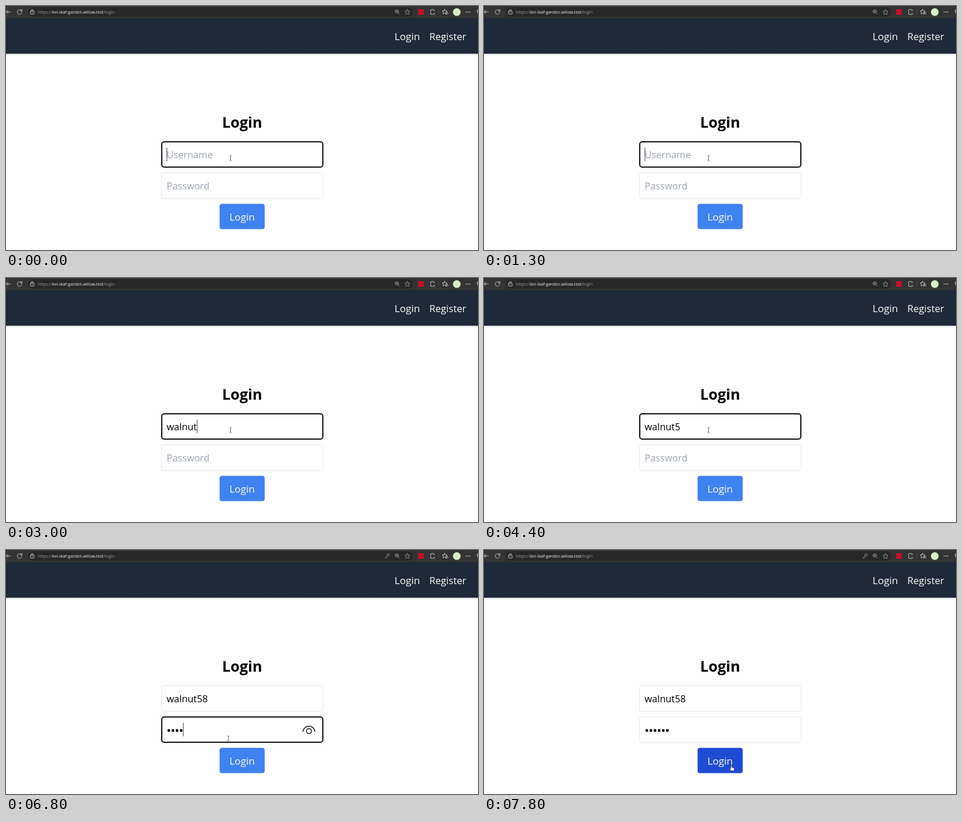
Write an HTML page that moves like this. It is 800 px wide and 415 px high and loops after 8000 ms.

```html
<!DOCTYPE html>
<html lang="en">
<head>
<meta charset="utf-8">
<title>Login form</title>
<style>
  html, body { margin: 0; width: 100%; height: 100%; overflow: hidden; background: #fefefe; }
  svg { display: block; width: 100%; height: 100%; }
  text { font-family: "Open Sans", "Noto Sans", sans-serif; font-size: 16.2px; white-space: pre; }
  .icon { fill: none; stroke: #c4c4c4; stroke-width: 1; stroke-linecap: round; stroke-linejoin: round; }
  .dim { stroke: #8e8e8e; }
  .hint { fill: #9ca3af; }
  .light { fill: #fff; }
</style>
</head>
<body>
<svg viewBox="0 0 800 415" xmlns="http://www.w3.org/2000/svg">
  <defs>
    <linearGradient id="shade" x1="0" y1="0" x2="0" y2="1">
      <stop offset="0" stop-color="#1f2937" stop-opacity=".28"/>
      <stop offset="1" stop-color="#1f2937" stop-opacity="0"/>
    </linearGradient>
  </defs>
  <rect width="800" height="415" fill="#fefefe"/>

  <!-- browser bar -->
  <rect width="800" height="21" fill="#333"/>
  <rect x="36.5" y="1.5" width="654" height="17.5" rx="8.7" fill="#272727" stroke="#3e3e3e" stroke-width=".6"/>
  <path class="icon" d="M0.5 10H7.5M3.5 7L0.5 10L3.5 13"/>
  <path class="icon" d="M26.6 8.2A4 4 0 1 0 27 11M27 5.8V8.6H24.2"/>
  <g class="icon">
    <rect x="41.3" y="8.8" width="6.4" height="5" rx="1"/>
    <path d="M42.8 8.6V7.6A1.7 1.7 0 0 1 46.2 7.6V8.6M44.5 11V11.6"/>
  </g>
  <text x="54" y="12.8" fill="#9d9d9d" style="font-size:7.15px">https://<tspan fill="#f2f2f2">kin-leaf-garden.willow.test</tspan>/login</text>
  <g id="key" class="icon dim">
    <circle cx="647.5" cy="8.8" r="2.2"/>
    <path d="M645.8 10.4L642.6 13.6H644.6"/>
  </g>
  <g class="icon dim">
    <circle cx="662.3" cy="9.3" r="3"/>
    <path d="M664.6 11.6L667 14M661 9.3H663.6M662.3 8V10.6"/>
    <path id="star"/>
  </g>
  <rect x="698.5" y="5.5" width="9.5" height="9.5" fill="#c9102f"/>
  <path class="icon" d="M726.2 8.2V7H723.8A1.6 1.6 0 0 0 720.6 7H719.5V9A1.6 1.6 0 0 1 719.5 12V14H726.2V12.4"/>
  <path d="M733.5 7V13" stroke="#555" stroke-width=".8"/>
  <path id="favs" class="icon"/>
  <path class="icon" d="M746.5 10.8H749M746 13H749"/>
  <circle cx="764" cy="10.3" r="6.5" fill="#d8ecca"/>
  <g fill="#d0d0d0"><circle cx="780" cy="10.3" r=".9"/><circle cx="783" cy="10.3" r=".9"/><circle cx="786" cy="10.3" r=".9"/></g>
  <rect x="798.6" y="6" width="1.4" height="6" fill="#a8a8a8"/>

  <!-- page header -->
  <rect y="20.5" width="800" height="60.5" fill="#1f2937"/>
  <rect y="81" width="800" height="3" fill="url(#shade)"/>
  <text class="light" x="658.6" y="57.8" style="font-size:17px">Login</text>
  <text class="light" x="717.6" y="57.8" style="font-size:16.5px">Register</text>

  <!-- form -->
  <text x="400.2" y="207" text-anchor="middle" font-weight="700" style="font-size:25px">Login</text>
  <rect id="nameBox" rx="4"/>
  <rect id="passBox" rx="4"/>
  <text id="nameHint" class="hint" x="272.2" y="259.4">Username</text>
  <text id="name" x="272.2" y="259.4"></text>
  <text id="passHint" class="hint" x="272.2" y="312.4">Password</text>
  <g id="dots"></g>
  <g id="eye" fill="none" stroke="#161616" stroke-width="1.5" stroke-linecap="round">
    <path d="M503.3 308.5C505.5 296.8 521.5 296.8 523.7 308.5"/>
    <circle cx="513.5" cy="308" r="4.2"/>
  </g>
  <rect id="caret" width="1" height="23" fill="#444"/>
  <rect id="button" x="362" y="336.5" width="76.5" height="43" rx="4"/>
  <text class="light" x="400.2" y="364.8" text-anchor="middle" style="font-size:17px">Login</text>

  <!-- pointers -->
  <path id="beam" d="M-1.8 -4H-.5L0 -3.6L.5 -4H1.8M0 -3.6V3.6M-1.8 4H-.5L0 3.6L.5 4H1.8" fill="none" stroke="#555" stroke-width=".9"/>
  <path id="hand" d="M-2 -4.4Q-1 -5.6 0 -4.4V-1.3L3.2 -.6Q4.2 -.2 4 1.2L3.2 4.8H-1.2L-3.8 1.4Q-4 .2 -2 .8Z" fill="#fff" stroke="#222" stroke-width=".8" stroke-linejoin="round"/>
</svg>
<script>
const LOOP = 8000, LEFT = 272.2, DOT_STEP = 6.95;
const FOCUS_PASS = 5300, FIRST_KEY = 6000, HOVER = 7200, CLICK = 7700;

// each entry: start time, value held until the next entry
const typed = [[0, ''], [1600, 'wa'], [2200, 'wal'], [2700, 'waln'], [2800, 'walnu'],
  [3000, 'walnut'], [3100, 'walnut5'], [3500, 'walnut52'], [4400, 'walnut5'], [4700, 'walnut58']];
const secret = [[0, 0], [6000, 2], [6100, 3], [6800, 4], [7000, 5], [7200, 6]];
const blink = [[0, true], [800, false], [1300, true], [4400, false], [4700, true], [CLICK, false]];
const pointer = [[0, [380.5, 258.5]], [5000, [380, 266]], [5100, [379, 282]], [5200, [377, 300]],
  [5300, [376.2, 307]], [5400, [376.2, 308.7]], [6100, [376.5, 313.5]], [6300, [377, 315]],
  [6400, [377, 316.7]], [6800, [377, 320.5]], [7000, [377, 323.5]], [7200, [382, 340]],
  [7300, [390.5, 348]], [7400, [415, 362]], [7500, [436, 371]], [7700, [428, 371]], [7800, [420.2, 371]]];

const el = id => document.getElementById(id);
const held = (track, t) => track.filter(([start]) => start <= t).pop()[1];
const show = (id, on) => el(id).setAttribute('visibility', on ? 'visible' : 'hidden');
const set = (id, attrs) => {
  for (const k in attrs) el(id).setAttribute(k, attrs[k]);
};

function starPath(cx, cy, r) {
  const points = Array.from({ length: 10 }, (_, i) => {
    const a = i * Math.PI / 5 - Math.PI / 2, d = i % 2 ? r * 0.48 : r;
    return (cx + d * Math.cos(a)).toFixed(2) + ' ' + (cy + d * Math.sin(a)).toFixed(2);
  });
  return 'M' + points.join('L') + 'Z';
}

function drawBox(id, y, focused) {
  const inset = focused ? 1 : 0.5;
  set(id, {
    x: 263 + inset, y: y + inset, width: 275 - 2 * inset, height: 45 - 2 * inset,
    fill: '#fff', stroke: focused ? '#111' : '#e5e7eb', 'stroke-width': 2 * inset
  });
}

function render(t) {
  const name = held(typed, t), count = held(secret, t);
  const onPass = t >= FOCUS_PASS, done = t >= CLICK;

  drawBox('nameBox', 230, !onPass);
  drawBox('passBox', 283, onPass && !done);

  el('name').textContent = name;
  show('nameHint', !name);
  show('passHint', !count);
  [...el('dots').children].forEach((dot, i) =>
    dot.setAttribute('visibility', i < count ? 'visible' : 'hidden'));
  show('eye', count && !done);
  show('key', t >= FIRST_KEY);

  const width = onPass ? count * DOT_STEP : name ? el('name').getComputedTextLength() : 0;
  set('caret', { x: LEFT + width, y: onPass ? 294 : 241 });
  show('caret', held(blink, t));

  const hover = t >= HOVER, [x, y] = held(pointer, t);
  set('button', { fill: hover ? '#1f4bd4' : '#3f82f1' });
  show('beam', !hover);
  show('hand', hover);
  set(hover ? 'hand' : 'beam', { transform: `translate(${x} ${y})` });
}

set('star', { d: starPath(680.5, 10.5, 4.6) });
set('favs', { d: starPath(743.5, 10, 4.4) });
for (let i = 0; i < 6; i++) {
  const dot = document.createElementNS('http://www.w3.org/2000/svg', 'circle');
  dot.setAttribute('cx', 276 + i * DOT_STEP);
  dot.setAttribute('cy', 307);
  dot.setAttribute('r', 2.4);
  el('dots').append(dot);
}

const begin = performance.now();
function frame() {
  render((performance.now() - begin) % LOOP);
  requestAnimationFrame(frame);
}
frame();
</script>
</body>
</html>
```
